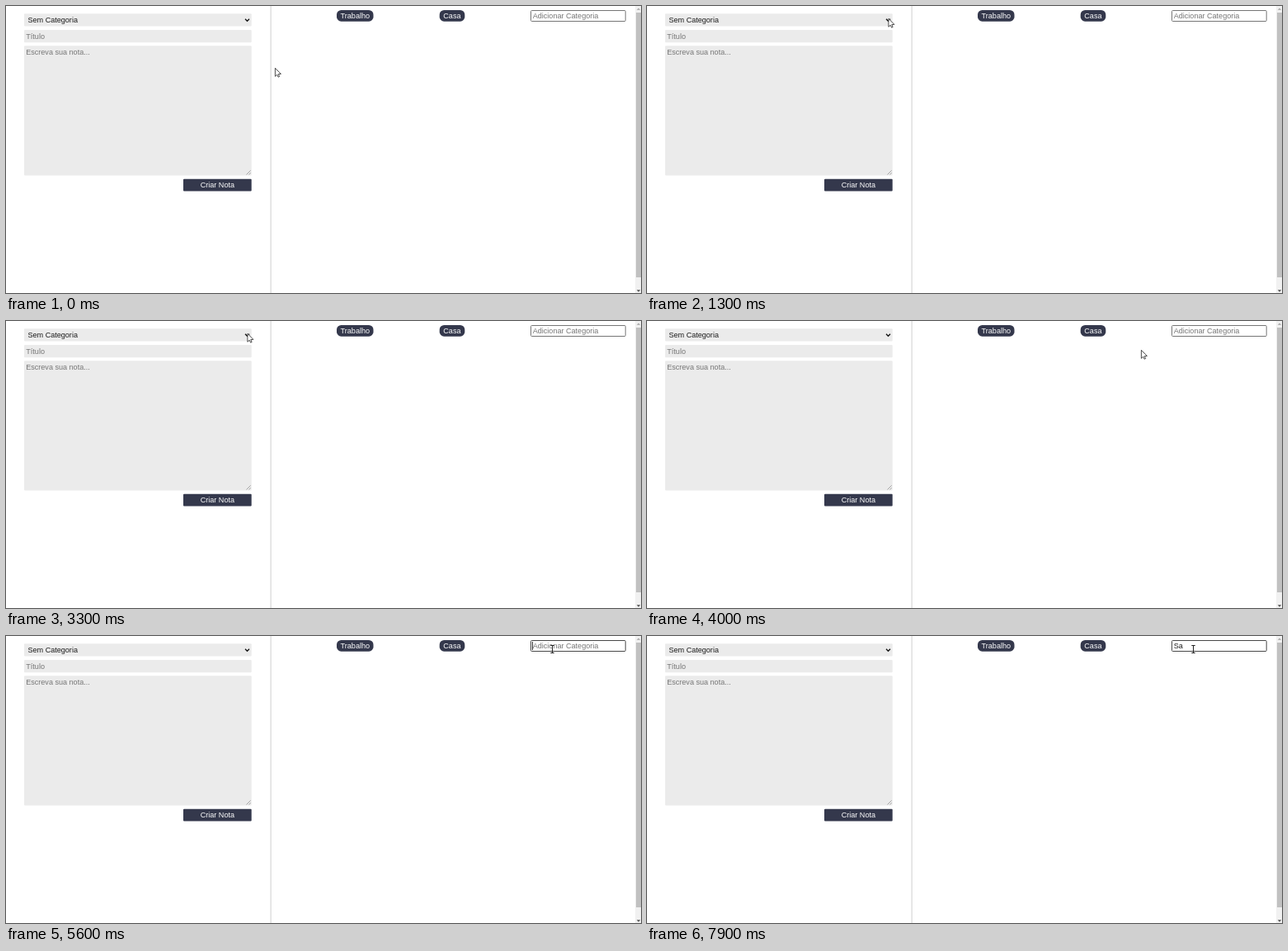
These frames come from a looping animation (770 by 348 pixels, 8 s). An HTML page with a canvas:

```html
<!DOCTYPE html>
<html lang="pt">
<head>
<meta charset="utf-8">
<title>Notas</title>
<style>
  html, body { margin: 0; width: 100%; height: 100%; overflow: hidden; background: #fff; }
  canvas { display: block; }
</style>
</head>
<body>
<canvas id="stage" width="770" height="348"></canvas>
<script>
const ctx = document.getElementById('stage').getContext('2d');
const LOOP = 8000, STEP = 100;
const PANEL = '#ebebeb', NAVY = '#34384c', HINT = '#757575', INK = '#1c1c1c';

// Pointer tip per step, starting at the given time
const toSelect = { start: 100, points: [
  [326, 75], [323, 74], [316, 73], [305, 70], [292, 65], [279, 57],
  [270, 46], [270, 34], [278, 26], [288, 23], [290, 19], [292, 16], [292.5, 15]
] };
const toField = { start: 3500, points: [
  [292.5, 15], [302, 19], [345, 27], [420, 33], [515, 35], [599, 35], [640, 25]
] };
const BEAM_FROM = 4200;

function rect(x, y, w, h, color) {
  ctx.fillStyle = color;
  ctx.fillRect(x, y, w, h);
}

function text(label, x, y, color = INK) {
  ctx.font = '9.07px "Liberation Sans", Arial, sans-serif';
  ctx.fillStyle = color;
  ctx.fillText(label, x, y);
}

function polygon(points, fill, stroke, width = 0.8) {
  ctx.beginPath();
  points.forEach(([x, y]) => ctx.lineTo(x, y));
  ctx.closePath();
  ctx.fillStyle = fill;
  ctx.fill();
  if (!stroke) return;
  ctx.strokeStyle = stroke;
  ctx.lineWidth = width;
  ctx.stroke();
}

function lines(paths, color, width) {
  ctx.beginPath();
  for (const path of paths) {
    path.forEach(([x, y], i) => i ? ctx.lineTo(x, y) : ctx.moveTo(x, y));
  }
  ctx.strokeStyle = color;
  ctx.lineWidth = width;
  ctx.stroke();
}

function roundBox(x, y, w, h, r, color) {
  ctx.beginPath();
  ctx.roundRect(x, y, w, h, r);
  ctx.fillStyle = color;
  ctx.fill();
}

function pill(label, x, w) {
  roundBox(x, 5, w, 13.7, 5.5, NAVY);
  text(label, x + 4.6, 15, '#fff');
}

function drawForm() {
  roundBox(22, 9.3, 275.7, 15.2, 1, PANEL);
  text('Sem Categoria', 26.5, 20.2);
  lines([[[290, 15.8], [292.5, 18.3], [295, 15.8]]], '#111', 1.3);

  roundBox(22, 29, 275.7, 15.3, 1, PANEL);
  text('Título', 24.3, 39.8, HINT);

  roundBox(22, 48.3, 275.7, 157.2, 1, PANEL);
  text('Escreva sua nota...', 24.2, 59, HINT);
  lines([[[291.5, 204.5], [296.7, 199.3]], [[294.5, 204.5], [296.7, 202.3]]], '#888', 0.7);

  roundBox(215, 209.7, 82.7, 14.8, 1, NAVY);
  text('Criar Nota', 235.7, 220.1, '#fff');
}

function drawMenu() {
  ctx.save();
  ctx.shadowColor = 'rgba(0,0,0,.45)';
  ctx.shadowBlur = 3;
  ctx.shadowOffsetY = 1;
  rect(22, 26, 276, 35.5, PANEL);
  ctx.restore();
  rect(22, 26.5, 276, 11.5, '#c8c8c8');
  ['Sem Categoria', 'Trabalho', 'Casa'].forEach((label, i) => text(label, 26.7, 35 + i * 11.4));
}

function drawField(t) {
  const border = t < 4500 ? '#767676' : t < 4700 ? '#858585' : '#484848';
  ctx.beginPath();
  ctx.roundRect(636.5, 5.5, 114.7, 13, 1);
  ctx.strokeStyle = border;
  ctx.lineWidth = 1;
  ctx.stroke();

  const typed = t < 6900 ? '' : t < 7300 ? 'S' : 'Sa';
  if (typed) text(typed, 638.7, 15);
  else text('Adicionar Categoria', 638.7, 15, HINT);

  const caretOn = t >= 4500 && t < 7900 && !(t >= 5100 && t < 5600) && !(t >= 6200 && t < 6700);
  if (caretOn) {
    const x = Math.round(638.4 + (typed ? ctx.measureText(typed).width : 0));
    rect(x, 7, 0.9, 10, '#222');
  }
}

function drawScrollbar() {
  rect(763, 0, 7, 348, '#f1f1f1');
  rect(764, 8, 6, 321, '#c1c1c1');
  polygon([[764.8, 4.8], [767, 2.4], [769.2, 4.8]], '#a3a3a3');
  polygon([[764.8, 344.2], [769.2, 344.2], [767, 346.7]], '#505050');
}

function drawArrow([x, y]) {
  const shape = [[0, 0], [0, 10], [2.3, 7.9], [3.7, 10.9], [5.2, 10.2], [3.9, 7.3], [7, 7.1]];
  polygon(shape.map(([dx, dy]) => [x + 0.4 + dx, y + 0.3 + dy]), '#fff', '#222');
}

function drawBeam(x, y) {
  lines([
    [[x, y - 4.5], [x, y + 4.5]],
    [[x - 2.2, y - 4.5], [x + 2.2, y - 4.5]],
    [[x - 2.2, y + 4.5], [x + 2.2, y + 4.5]]
  ], '#222', 1);
}

function pointAt({ start, points }, t) {
  const i = Math.floor((t - start) / STEP);
  return points[Math.max(0, Math.min(points.length - 1, i))];
}

function drawPointer(t) {
  if (t >= BEAM_FROM) {
    drawBeam(t < 4300 ? 659.5 : 662.5, t < 4900 ? 15 : 16);
  } else {
    drawArrow(pointAt(t < toField.start ? toSelect : toField, t));
  }
}

function draw(t) {
  rect(0, 0, 770, 348, '#fff');
  drawForm();
  rect(320.6, 0, 1, 348, '#cfcfcf');
  pill('Trabalho', 401, 44.5);
  pill('Casa', 525.7, 30.6);
  drawField(t);
  drawScrollbar();
  if (t >= 1700 && t < 3300) drawMenu();
  drawPointer(t);
}

let begin;
function tick(now) {
  begin ??= now;
  draw((now - begin) % LOOP);
  requestAnimationFrame(tick);
}
draw(0);
requestAnimationFrame(tick);
</script>
</body>
</html>
```
